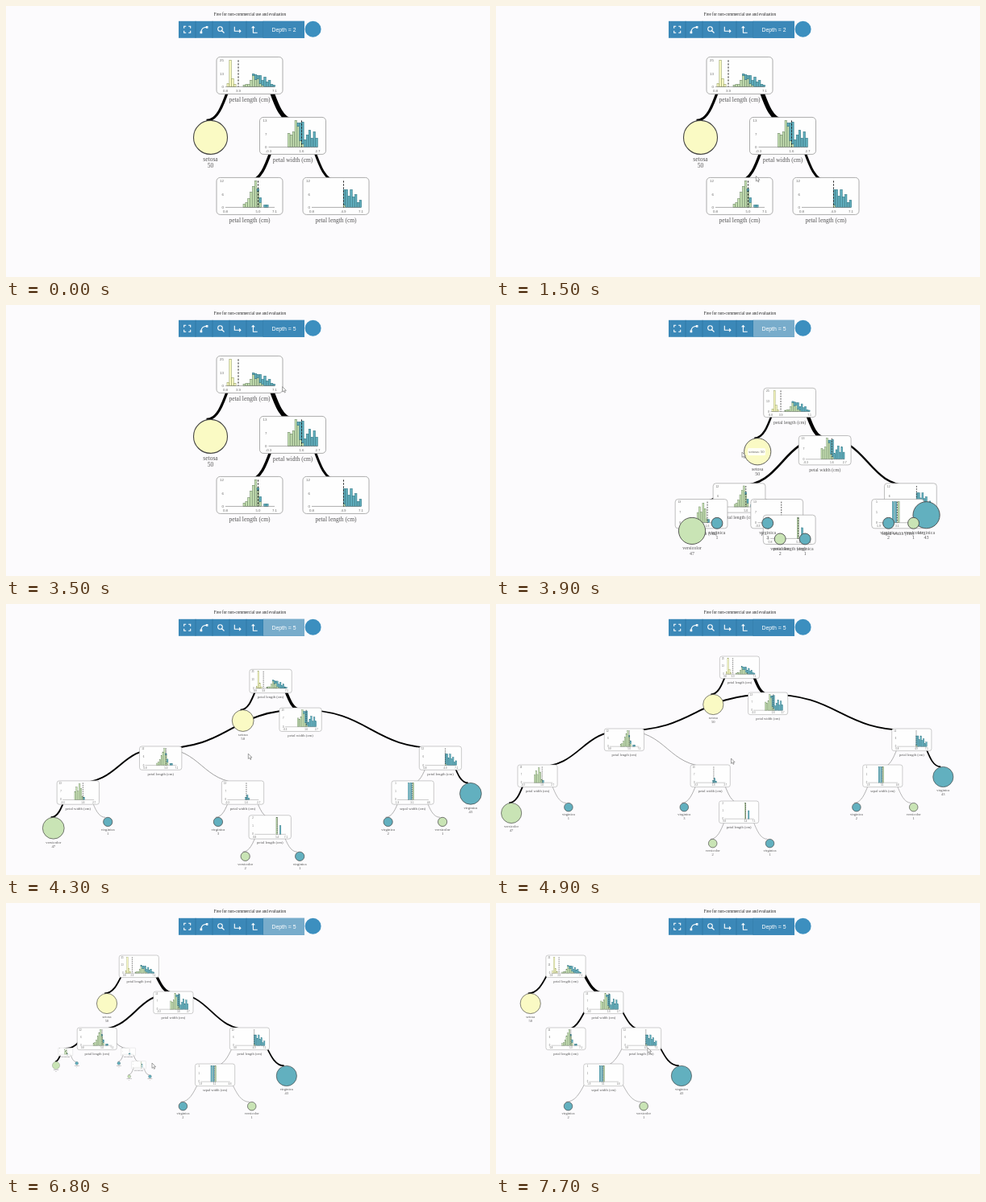
These frames come from a looping animation (600 by 337 pixels, 8000 ms). An HTML page:

```html
<!DOCTYPE html>
<html lang="en">
<head>
<meta charset="utf-8">
<title>Decision tree</title>
<style>
html, body { margin: 0; width: 100%; height: 100%; overflow: hidden; background: #fcfbfd; }
svg { display: block; width: 100%; height: 100%; }
.serif { font-family: "Liberation Serif", "Noto Serif", serif; }
.sans { font-family: "Liberation Sans", Roboto, sans-serif; }
</style>
</head>
<body>
<svg id="stage" viewBox="0 0 600 337"></svg>
<script>
const LOOP = 8000, BLUE = '#3b88b8', ROW = 75, CARD_MID = 19;
const COLORS = { s: '#fafac4', e: '#c9e4b5', v: '#62b0bf' };
const EDGES = { s: '#8f9a5c', e: '#66805c', v: '#28707e' };
const NAMES = { s: 'setosa', e: 'versicolor', v: 'virginica' };
const stage = document.getElementById('stage');

function add(parent, tag, attrs, text) {
  const el = document.createElementNS('http://www.w3.org/2000/svg', tag);
  for (const key in attrs) el.setAttribute(key, attrs[key]);
  if (text !== undefined) el.textContent = text;
  parent.appendChild(el);
  return el;
}
const label = (parent, x, y, size, text, attrs) => add(parent, 'text',
  { x, y, 'font-size': size, 'text-anchor': 'middle', fill: '#555', class: 'serif', ...attrs }, text);
const clamp = v => Math.max(0, Math.min(1, v));
const lerp = (a, b, t) => a + (b - a) * t;
const ease = t => (1 - Math.cos(Math.PI * t)) / 2;
const show = (el, on) => el.setAttribute('visibility', on ? 'visible' : 'hidden');

// x: offset from the parent in the shallow, full and collapsed layout; null = absent.
const nodes = [
  { id: 'root', n: 150, x: [0, 0, 0], card: {
    name: 'petal length', top: [25, 13], ticks: ['0.8', '3.9', '7.1'], split: -14,
    bars: [['s', 0, [4, 33, 10, 3]], ['e', 7, [2, 3, 3, 8, 14, 9, 10, 4, 2]],
      ['v', 11, [2, 6, 4, 10, 6, 12, 6, 8, 3, 2]]] } },
  { id: 'S', up: 'root', n: 50, x: [-53.5, -59.5, -78], leaf: 's' },
  { id: 'P', up: 'root', n: 100, x: [53.5, 58.5, 78], card: {
    name: 'petal width', top: [13, 7], ticks: ['-0.3', '1.6', '2.7'], split: 11,
    bars: [['e', 7.7, [17, 15, 19, 33, 26, 8, 4]], ['v', 11.7, [4, 22, 27, 9, 15, 21, 11, 19, 11]]] } },
  { id: 'L', up: 'P', n: 54, x: [-53.5, -297, -78], card: {
    name: 'petal length', top: [12, 6], ticks: ['0.8', '5.0', '7.1'], split: 10.5,
    bars: [['e', 7, [4, 6, 11, 19, 26, 33, 20, 6]], ['v', 13, [3, 6, 0, 3, 3]]] } },
  { id: 'R', up: 'P', n: 46, x: [53.5, 297, 78], card: {
    name: 'petal length', top: [12, 6], ticks: ['0.8', '4.9', '7.1'], split: 9.5,
    bars: [['e', 13, [3]], ['v', 13, [19, 22, 14, 22, 13, 16, 6, 9]]] } },
  { id: 'LL', up: 'L', n: 48, x: [null, -179, null], card: {
    name: 'petal width', top: [13, 7], ticks: ['-0.3', '1.6', '2.7'], split: 9.5,
    bars: [['e', 7.4, [16, 25, 17, 31, 22, 6]], ['v', 13.4, [5]]] } },
  { id: 'LR', up: 'L', n: 6, x: [null, 178, null], card: {
    name: 'petal width', top: [13, 7], ticks: ['-0.3', '1.6', '2.7'], split: 7,
    bars: [['v', 11.5, [5, 9, 3]]] } },
  { id: 'RL', up: 'R', n: 3, x: [null, -60, -78], card: {
    name: 'sepal width', top: [1, 1], ticks: ['1.9', '3.1', '4.6'], split: -1,
    bars: [['v', 6.8, [33]], ['v', 8.3, [33]], ['e', 9.8, [33]]] } },
  { id: 'RR', up: 'R', n: 43, x: [null, 60, 78], leaf: 'v' },
  { id: 'LRR', up: 'LR', n: 3, x: [null, 59, null], card: {
    name: 'petal length', top: [2, 1], ticks: ['0.8', '5.4', '7.1'], split: 14,
    bars: [['e', 14, [33]], ['v', 16.4, [17]]] } },
  { id: 'LLa', up: 'LL', n: 47, x: [null, -59, null], leaf: 'e' },
  { id: 'LLb', up: 'LL', n: 1, x: [null, 59, null], leaf: 'v' },
  { id: 'LRa', up: 'LR', n: 3, x: [null, -59, null], leaf: 'v' },
  { id: 'RLa', up: 'RL', n: 2, x: [null, -59, -78], leaf: 'v' },
  { id: 'RLb', up: 'RL', n: 1, x: [null, 59, 78], leaf: 'e' },
  { id: 'La', up: 'LRR', n: 2, x: [null, -59, null], leaf: 'e' },
  { id: 'Lb', up: 'LRR', n: 1, x: [null, 59, null], leaf: 'v' }
];
const byId = Object.fromEntries(nodes.map(n => [n.id, n]));

function drawCard(node, c) {
  const g = add(node, 'g', { transform: `translate(0 ${CARD_MID})` });
  const base = 14, pitch = 2.86, stack = {};
  add(g, 'rect', { x: -41, y: -23, width: 82, height: 46, rx: 4.5, fill: '#fefefe', stroke: '#999', 'stroke-width': .8 });
  for (const [kind, start, heights] of c.bars) heights.forEach((h, i) => {
    if (!h) return;
    const slot = (start + i).toFixed(1), low = stack[slot] || 0;
    stack[slot] = low + h;
    add(g, 'rect', { x: -28 + slot * pitch, y: base - low - h, width: pitch - .4, height: h,
      fill: COLORS[kind], stroke: EDGES[kind], 'stroke-width': .55 });
  });
  add(g, 'path', { d: `M-30 ${base}H31`, stroke: '#777', 'stroke-width': .6 });
  add(g, 'path', { d: `M${c.split} -19V${base}`, stroke: '#222', 'stroke-width': 1, 'stroke-dasharray': '2.2 1.8' });
  const tick = { class: 'sans', fill: '#666' };
  [...c.top, 0].forEach((v, i) => label(g, -32, -17 + i * 16.3, 4.4, v, { ...tick, 'text-anchor': 'end' }));
  c.ticks.forEach((v, i) => label(g, [-30, c.split, 31][i], 21, 4.4, v, tick));
  label(g, 0, 33, 7.5, c.name + ' (cm)');
}

function drawLeaf(node, n) {
  const r = n.n > 40 ? 21 : 8.8;
  const g = add(node, 'g', { transform: `translate(5 ${r})` });
  add(g, 'circle', { r, fill: COLORS[n.leaf], stroke: '#444', 'stroke-width': 1.1 });
  label(g, 0, r + 8.5, 7.5, NAMES[n.leaf]);
  label(g, 0, r + 16.8, 7.5, n.n);
}

const links = add(stage, 'g', { fill: 'none' });
const tree = add(stage, 'g', {});
for (const n of nodes) {
  if (n.up) n.link = add(links, 'path', { stroke: n.n < 10 ? '#777' : '#000' });
  n.g = add(tree, 'g', {});
  if (n.card) drawCard(n.g, n.card); else drawLeaf(n.g, n);
}

label(stage, 302.5, 12.3, 5.05, 'Free for non-commercial use and evaluation', { fill: '#222' });

// Toolbar
add(stage, 'rect', { x: 214, y: 18.8, width: 156, height: 21, fill: BLUE });
for (let i = 1; i < 6; i++)
  add(stage, 'path', { d: `M${214 + i * 21} 18.8v21`, stroke: '#2f76a3', 'stroke-width': .8 });
const icons = [
  'M-4 -1.5V-4H-1.5M1.5 -4H4V-1.5M4 1.5V4H1.5M-1.5 4H-4V1.5',
  'M-3.6 3.6C-3.6 -1 -1 -3 3.4 -3M-4.4 2.8h1.6v1.6h-1.6zM2.8 -3.8h1.6v1.6h-1.6z',
  'M2 -.8A2.8 2.8 0 1 1 -3.6 -.8A2.8 2.8 0 1 1 2 -.8M1.2 1.2L4.2 4.2',
  'M-3.8 -3.5V2H3.8M2 .2L3.8 2L2 3.8',
  'M3.8 4H-1.5V-3.8M-3.3 -2L-1.5 -3.8L.3 -2'
];
icons.forEach((d, i) => add(stage, 'path', { d, transform: `translate(${224.7 + i * 20.8} 29.3)`,
  fill: 'none', stroke: '#fff', 'stroke-width': 1.1 }));
const button = add(stage, 'rect', { x: 319, y: 18.8, width: 51, height: 21 });
const depth = label(stage, 344.5, 31.6, 6.9, '', { class: 'sans', fill: '#fff' });
add(stage, 'circle', { cx: 380.6, cy: 28.8, r: 10, fill: '#3c8fbf' });

// Depth menu
const menu = add(stage, 'g', {});
add(menu, 'rect', { x: 319, y: 19.1, width: 51, height: 20.4, fill: 'none', stroke: '#173f58', 'stroke-width': 1.3 });
add(menu, 'rect', { x: 319, y: 41, width: 51, height: 67, rx: 2.5, fill: BLUE });
const pick = add(menu, 'rect', { x: 319, width: 51, height: 10.6, fill: '#706b6a' });
for (let i = 0; i < 6; i++)
  label(menu, 344, 49.3 + i * 11.05, 6.6, 'Depth = ' + i, { class: 'sans', fill: '#fff' });

const tip = add(stage, 'g', {});
add(tip, 'rect', { x: 312, y: 178, width: 22, height: 9, rx: 1.5, fill: '#fff', opacity: .85 });
label(tip, 323, 184, 4.2, 'setosa: 50', { class: 'sans', fill: '#666' });

const cursor = add(stage, 'path', { d: 'M0 0V6.4L1.5 5.1L2.6 7.4L3.6 6.9L2.6 4.7H4.6Z',
  fill: '#fff', stroke: '#666', 'stroke-width': .6 });
const trail = [[900, 330, 340], [1600, 322, 205], [2350, 345, 30], [2550, 345, 30], [2800, 343, 76],
  [3150, 344, 99], [3450, 344, 99], [3900, 305, 183], [4900, 291.5, 192], [5500, 291, 192],
  [6050, 164, 170], [6300, 164, 170], [6800, 181, 199], [7300, 188, 180], [LOOP, 188, 180]];

function moveCursor(t) {
  const i = trail.findIndex(p => p[0] > t);
  show(cursor, i > 0);
  if (i < 1) return;
  const a = trail[i - 1], b = trail[i], k = ease((t - a[0]) / (b[0] - a[0]));
  cursor.setAttribute('transform', `translate(${lerp(a[1], b[1], k)} ${lerp(a[2], b[2], k)})`);
}

// Each node hangs from an anchor just inside its top; links join the anchors.
function moveTree(u, w) {
  const grow = ease(u), fold = ease(w);
  const scale = lerp(1, .6, 1 - (1 - u) ** 1.5);
  const bump = Math.sin(Math.PI * u) ** 2;
  for (const n of nodes) {
    const [a, b, c] = n.x, up = byId[n.up];
    const born = a === null ? grow : 1, left = c === null ? 1 - fold : 1;
    const on = born > 0 && left > 0;
    if (up) {
      // A folding branch shrinks into the middle of the card that stays.
      const sink = up.x[2] === null ? 0 : CARD_MID * (1 - left);
      n.px = up.px + lerp(lerp(a || 0, b, grow), c || 0, fold) * scale;
      n.py = up.py + (ROW * born * left + sink) * scale;
      const mid = (up.px + n.px) / 2;
      n.link.setAttribute('d', `M${up.px} ${up.py}C${mid} ${up.py} ${mid} ${n.py} ${n.px} ${n.py}`);
      n.link.setAttribute('stroke-width', (.8 + .047 * n.n) * scale);
      show(n.link, on);
    } else {
      n.px = lerp(302, 86.5, fold) + 70 * bump;
      n.py = 67.4 + 44 * bump;
    }
    show(n.g, on);
    n.g.setAttribute('opacity', clamp(born * 8));
    n.g.setAttribute('transform', `translate(${n.px} ${n.py}) scale(${scale * left})`);
  }
}

function render(t) {
  const u = clamp((t - 3510) / 1000), w = clamp((t - 6213) / 1000);
  moveTree(u, w);
  const busy = (u > 0 && u < 1) || (w > 0 && w < 1);
  button.setAttribute('fill', busy ? '#78accb' : BLUE);
  depth.textContent = 'Depth = ' + (t < 3460 ? 2 : 5);
  show(menu, t >= 2500 && t < 3460);
  pick.setAttribute('y', 63.7 + 11.05 * (t < 2900 ? 0 : t < 3000 ? 1 : t < 3100 ? 2 : 3));
  show(tip, t >= 3800 && t < 4050);
  moveCursor(t);
}

function frame() {
  render(performance.now() % LOOP);
  requestAnimationFrame(frame);
}
frame();
</script>
</body>
</html>
```
